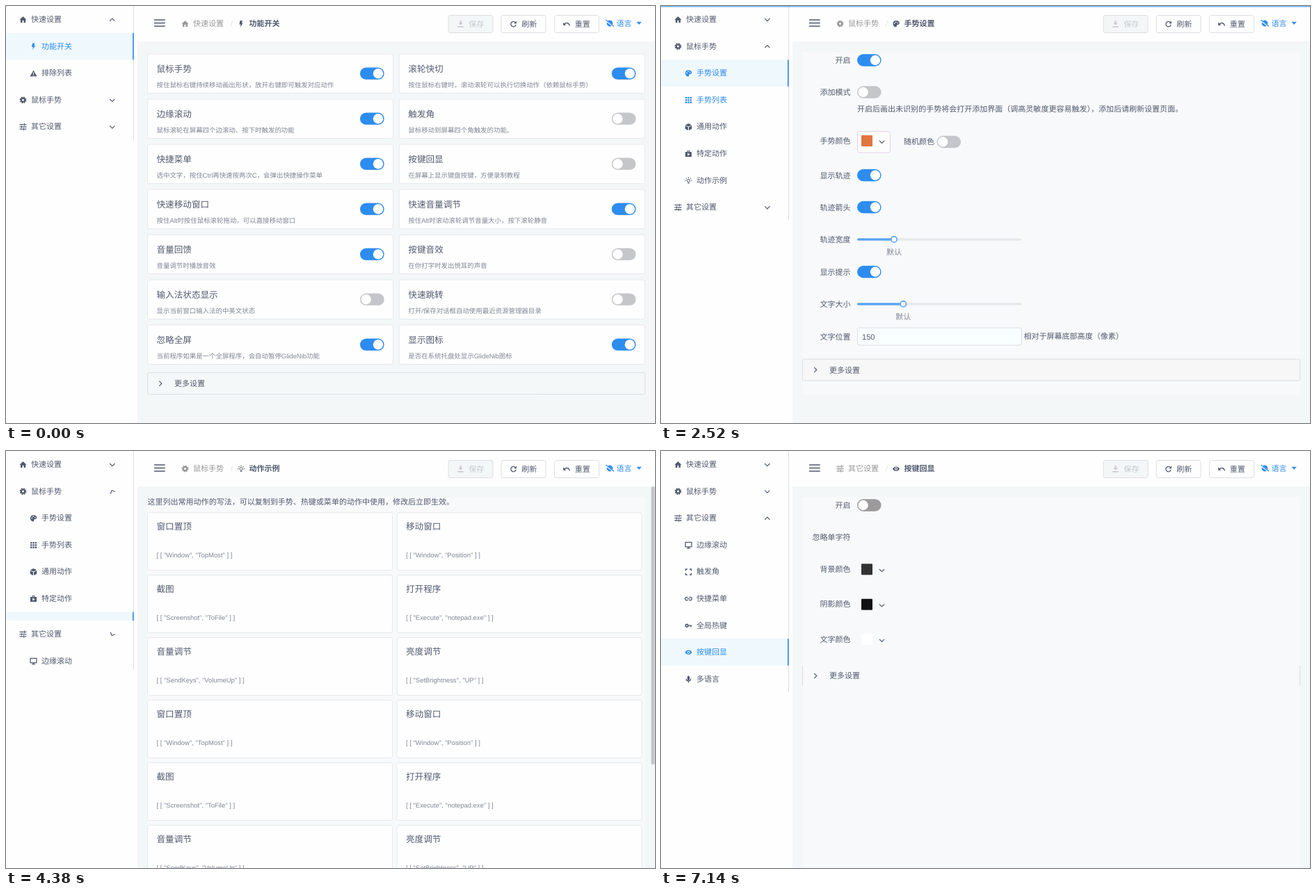
Animation, 933 px wide and 600 px high, one loop 7380 ms. Source, as an HTML page:

```html
<!DOCTYPE html>
<html lang="zh-CN">
<head>
<meta charset="utf-8">
<title>设置</title>
<style>
html, body { margin: 0; width: 100%; height: 100%; overflow: hidden; background: #f3f7f8; }
svg { display: block; }
#stage { width: 100%; height: 100%; }
text { font-family: "Liberation Sans", "Noto Sans CJK SC", "Noto Sans CJK", sans-serif; text-rendering: geometricPrecision; }
.ln { fill: none; stroke: currentColor; stroke-width: 1.3; }
.page { visibility: hidden; }
.page.on { visibility: visible; }
</style>
</head>
<body>
<svg id="stage" viewBox="0 0 933 600"></svg>
<script>
const INK = '#515a6e', BLUE = '#2d8cf0', GREY = '#808695', EDGE = '#dcdee2', PINK = '#e3b5ea';
const BIG = 12.6, MID = 11.02, SMALL = 9.45, ROW = 38.6;

// ---- drawing helpers ----
const text = (x, y, s, size = MID, fill = INK, more = '') =>
  `<text x="${x}" y="${(y + size * 0.37).toFixed(2)}" font-size="${size}" fill="${fill}" ${more}>${s}</text>`;
const END = 'text-anchor="end"', CENTER = 'text-anchor="middle"', BOLD = 'font-weight="700"';
const rect = (x, y, w, h, fill, stroke = 'none', r = 0) =>
  `<rect x="${x}" y="${y}" width="${w}" height="${h}" rx="${r}" fill="${fill}" stroke="${stroke}"/>`;
const line = (d, color, w = 1) => `<path d="${d}" fill="none" stroke="${color}" stroke-width="${w}"/>`;
const chevron = (x, y, turn = 0) =>
  `<path transform="translate(${x} ${y}) rotate(${turn})" d="M-3.6-1.8L0 1.8 3.6-1.8" fill="none" stroke="${INK}" stroke-width="1.2"/>`;
const toggle = (x, y, on, off = '#c5c6c9') =>
  rect(x, y - 8.65, 34.6, 17.3, on ? BLUE : off, 'none', 8.65) +
  `<circle cx="${x + (on ? 26 : 8.65)}" cy="${y}" r="7.2" fill="#fff"/>`;
const check = (y, on, off = EDGE) => on
  ? rect(220, y - 6.2, 12.4, 12.4, BLUE, 'none', 1.6) + line(`M223.2 ${y}l2.2 2.3 4-4.3`, '#fff', 1.5)
  : rect(220.5, y - 5.7, 11.4, 11.4, '#fff', off, 1.6);
const button = (x, y, w, s) =>
  rect(x, y, w, 25.3, BLUE, 'none', 3) + text(x + w / 2, y + 12.6, s, MID, '#fff', CENTER + ' ' + BOLD);
const more = (y, s = '更多设置', x = 242, x2 = 918.5, fill = '#f5f8f8') =>
  rect(203.5, y, x2 - 203.5, 31, fill, EDGE, 2) + chevron(x - 20, y + 15.5, -90) + text(x, y + 15.5, s);
const label = (y, s) => text(272.5, y, s, MID, INK, END);
const links = (x, y, size, gap, ...words) => words.map((w, i) =>
  text(x + i * gap, y, w, size, BLUE) +
  (i ? line(`M${x + i * gap - 6.5} ${y - 4.5}v9`, EDGE) : '')).join('');
const cmd = (...a) => `[ [ ${a.map(s => `"${s}"`).join(', ')} ] ]`;
const HEAD = 28.4;
function grid(y, x2, rh, n, cols, edge = '#dfe2e8', inner = edge) {
  const h = HEAD + rh * n;
  let d = '';
  for (let i = 0; i < n; i++) d += `M203.5 ${y + HEAD + i * rh}H${x2}`;
  return rect(203.5, y, x2 - 203.5, h, '#fdfdfe') + rect(203.5, y, x2 - 203.5, HEAD, '#f8f9fa') +
    line(d, inner) + line(`M${cols[cols.length - 1] - 1} ${y}v${h}`, 'rgba(0,0,0,.05)', 3) +
    line(cols.map(x => `M${x} ${y}v${h}`).join(''), edge) + rect(203.5, y, x2 - 203.5, h, 'none', edge);
}
const heads = (y, list) => list.map(([x, s, a]) => text(x, y, s, SMALL, INK, BOLD + ' ' + (a || ''))).join('');
const panel = h => rect(203, 66, 716, h, '#f7f9fa');

// ---- icons, drawn around 0,0 ----
const solid = d => `<path fill="currentColor" fill-rule="evenodd" d="${d}"/>`;
const wire = d => `<path class="ln" d="${d}"/>`;
const ICONS = {
  home: solid('M-5 .2L0-4.6 5 .2H3.6V4.4H1V1.2H-1V4.4H-3.6V.2z'),
  bolt: solid('M-1.4-4.6H2L.8-1.2H2.6L-1.2 5-.5.8H-2.6z'),
  warn: solid('M0-4.4L5 4.4H-5zM-.6-1.2V1.8H.6V-1.2zM-.6 2.5V3.6H.6V2.5z'),
  gear: '<circle class="ln" r="2.6" style="stroke-width:2.2"/><circle class="ln" r="4.1" style="stroke-width:1.6" stroke-dasharray="1.9 1.32"/>',
  tune: wire('M-5-3.3H1M3-3.3H5M2-5V-1.6M-5 0H-3M-1 0H5M-2-1.7V1.7M-5 3.3H0M2 3.3H5M1 1.6V5'),
  palette: solid('M0-4.6C6-4.6 6 1.4 2 1.2 0 1.2 1.6 4.6-.4 4.6-6 4-6-4.6 0-4.6zM-3-1.2V.4H-1.6V-1.2zM-1-3.2V-1.8H.4V-3.2zM1.6-2V-.6H3V-2z'),
  dots: solid([-4.4, -1.1, 2.2].map(y => [-4.4, -1.1, 2.2].map(x => `M${x} ${y}h2.3v2.3h-2.3z`).join('')).join('')),
  cube: solid('M0-5L4.6-2.8 0-.6-4.6-2.8zM-4.8-1.9L-.5.2V5L-4.8 2.8zM4.8-1.9L.5.2V5L4.8 2.8z'),
  bag: solid('M-4.5-2.6H-2V-4.6H2V-2.6H4.5V4.5H-4.5zM-1-3.6V-2.6H1V-3.6zM-1.2-1V3L2.2 1z'),
  bulb: '<circle class="ln" r="2.1" style="stroke-width:1"/>' + wire('M-1.2 3.6H1.2M0-5V-3.8M-5 0H-3.8M5 0H3.8M-3.5-3.5l.8.8M3.5-3.5l-.8.8'),
  screen: wire('M-4.4-4H4.4V2.4H-4.4zM-2.4 4.4H2.4M0 2.4V4.4'),
  corners: wire('M-4-1.6V-4H-1.6M1.6-4H4V-1.6M4 1.6V4H1.6M-1.6 4H-4V1.6'),
  link: wire('M-.8-2.2H-2.6A2.2 2.2 0 0 0-2.6 2.2H-.8M.8-2.2H2.6A2.2 2.2 0 0 1 2.6 2.2H.8M-2 0H2'),
  key: '<circle class="ln" cx="-2.4" r="1.8" style="stroke-width:1.7"/>' + wire('M-.6 0H5M3.6 0V2.4'),
  eye: solid('M-5 0C-2.4-4.4 2.4-4.4 5 0 2.4 4.4-2.4 4.4-5 0zM0-2.1A2.1 2.1 0 1 0 .01-2.1z') + '<circle r="1.1" fill="currentColor"/>',
  mic: solid('M-1.6-3.4A1.6 1.6 0 0 1 1.6-3.4V0A1.6 1.6 0 0 1-1.6 0z') + wire('M-3.2-.6A3.2 3.2 0 0 0 3.2-.6M0 2.6V5'),
  save: solid('M-1-5H1V-1.6H3.2L0 1.6-3.2-1.6H-1zM-4.4 3H4.4V4.4H-4.4z'),
  reload: wire('M3.2-1.8A3.7 3.7 0 1 0 3.6 1') + solid('M4.4-4.4V-.8H.8z'),
  undo: wire('M-3.6.6C-1.4-2.6 3-2.4 4.4 2.4') + solid('M-5-2.6V1.8H-.8z'),
};
const icon = (name, x, y, color = INK) => `<g transform="translate(${x} ${y})" color="${color}">${ICONS[name]}</g>`;

// ---- menu ----
const GROUPS = [
  ['快速设置', 'home', ['功能开关', 'bolt'], ['排除列表', 'warn']],
  ['鼠标手势', 'gear', ['手势设置', 'palette'], ['手势列表', 'dots'], ['通用动作', 'cube'], ['特定动作', 'bag'], ['动作示例', 'bulb']],
  ['其它设置', 'tune', ['边缘滚动', 'screen'], ['触发角', 'corners'], ['快捷菜单', 'link'], ['全局热键', 'key'], ['按键回显', 'eye'], ['多语言', 'mic']],
];
const crumbs = [];
const menu = GROUPS.map(([name, ic, ...items]) =>
  `<g class="group">${icon(ic, 24.5, 19.5)}${text(36, 19, name)}<g class="arrow">${chevron(0, 0)}</g>` +
  `<svg class="sub" y="${ROW}" width="186" height="0" overflow="hidden">` + items.map(([s, i], k) => {
    crumbs.push(icon(ic, 257.5, 25.5, '#999') + text(269, 25.2, name, MID, '#999') + text(323, 25.2, '/', MID, EDGE) +
      icon(i, 338, 25.7) + text(349.5, 25.2, s, MID, INK, BOLD));
    return `<g class="item" transform="translate(0 ${k * ROW})">` +
      `<rect class="tint" width="183" height="${ROW}" fill="#eff8fd"/><rect class="mark" x="182" width="1.6" height="${ROW}" fill="${BLUE}"/>` +
      icon(i, 39.5, 19.6, 'inherit') + text(51, 19, s, MID, 'currentColor') + '</g>';
  }).join('') + '</svg></g>').join('');

// ---- pages ----
const CARDS = [
  ['鼠标手势', '按住鼠标右键持续移动画出形状，放开右键即可触发对应动作', 1], ['滚轮快切', '按住鼠标右键时，滚动滚轮可以执行切换动作（依赖鼠标手势）', 1],
  ['边缘滚动', '鼠标滚轮在屏幕四个边滚动、按下时触发的功能', 1], ['触发角', '鼠标移动到屏幕四个角触发的功能。', 0],
  ['快捷菜单', '选中文字，按住Ctrl再快速按两次C，会弹出快捷操作菜单', 1], ['按键回显', '在屏幕上显示键盘按键，方便录制教程', 0],
  ['快速移动窗口', '按住Alt时按住鼠标滚轮拖动，可以直接移动窗口', 1], ['快速音量调节', '按住Alt时滚动滚轮调节音量大小，按下滚轮静音', 1],
  ['音量回馈', '音量调节时播放音效', 1], ['按键音效', '在你打字时发出悦耳的声音', 0],
  ['输入法状态显示', '显示当前窗口输入法的中英文状态', 0], ['快速跳转', '打开/保存对话框自动使用最近资源管理器目录', 0],
  ['忽略全屏', '当前程序如果是一个全屏程序，会自动暂停GlideNib功能', 1], ['显示图标', '是否在系统托盘处显示GlideNib图标', 1],
];
const switches = () => CARDS.map(([name, note, on], i) => {
  const x = 203.5 + i % 2 * 361.8, y = 69 + (i >> 1) * 65;
  return rect(x, y, 353, 56.5, '#fefefe', '#e6e9ed', 3) + text(x + 13, y + 21, name, BIG) +
    text(x + 13, y + 44.3, note, SMALL, GREY) + toggle(x + 305.5, y + 28.2, on);
}).join('') + more(527.7);

const excluded = () => panel(494) + text(203.5, 72.5, '默认配置下，画手势Z可以添加程序到此列表中') +
  text(203.5, 97, '在此列表中的程序不会启用鼠标手势等功能，忽略大小写。') + text(203.5, 131, '当前排除程序列表：') +
  text(203.5, 164, 'Photoshop.exe') + text(919, 164, '删除', MID, BLUE, END) +
  rect(203.5, 186.5, 670, 24.5, '#fafafc', PINK, 3) + text(210, 198.8, 'Photoshop.exe', MID, '#c3b3e8') +
  rect(870, 186, 49, 25.3, BLUE, 'none', 2) + text(894.5, 198.5, '添加', MID, '#fff', CENTER);

const slider = (y, x) => rect(282, y - 1.6, 236.5, 3.2, '#e6e8eb', 'none', 1.6) + rect(282, y - 1.6, x - 282, 3.2, '#57a3f3', 'none', 1.6) +
  `<circle cx="${x}" cy="${y}" r="4.2" fill="#fff" stroke="#57a3f3" stroke-width="1.6"/>` + text(x, y + 18.5, '默认', MID, GREY, CENTER);
const settings = () => panel(494) +
  [[78, '开启', 1], [124, '添加模式', 0], [243.5, '显示轨迹', 1], [289.5, '轨迹箭头', 1], [382.5, '显示提示', 1]]
    .map(([y, s, on]) => label(y, s) + toggle(282, y, on)).join('') +
  text(282, 148, '开启后画出未识别的手势将会打开添加界面（调高灵敏度更容易触发），添加后请刷新设置页面。') +
  label(193.5, '手势颜色') + rect(282.5, 180.5, 47, 30.5, '#fdfdfe', '#e6cfe6', 3) + rect(288, 186, 16, 16, '#e17540', 'none', 1) +
  chevron(317.5, 195.5) + text(349, 195, '随机颜色') + toggle(396.5, 195.5, 0) +
  label(335.5, '轨迹宽度') + slider(335.8, 335) + label(428.5, '文字大小') + slider(428.8, 348.3) +
  label(475.5, '文字位置') + rect(282.5, 463, 236, 25, '#f8fdfe', EDGE, 3) + text(289, 476, '150') +
  text(521.5, 475, '相对于屏幕底部高度（像素）') + more(508, '更多设置', 242, 918.5, '#f6f7f6');

const STROKES = {
  UP: 'M0 17V-12', DOWN: 'M0-15V13', LEFT: 'M16 0H-13', RIGHT: 'M-16 0H13',
  'DOWN-UP': 'M-2.8-15L0 16 2.7-12', 'UP-DOWN': 'M-2.8 15L0-16 3 13',
  'DOWN-RIGHT': 'M-15.5-16V16H12', 'DOWN-LEFT': 'M15.5-16V16H-12',
  'RIGHT-LEFT': 'M-16-4L16 0-11 3.5', 'LEFT-RIGHT': 'M16-4L-16 0 12 2.2',
  h: 'M-6-16V16V0H6.5V12',
};
const gesture = (name, y) => `<path transform="translate(292.5 ${y})" d="${STROKES[name]}" fill="none" stroke="#e67b45" stroke-width="1.7" marker-start="url(#dot)" marker-end="url(#tip)"/>` +
  text(382, y, name, SMALL, '#c5c8ce', END + ' ' + BOLD);
function gestures(y, rows) {
  const mid = y + HEAD / 2;
  return grid(y, 912.5, 46.6, rows.length, [255, 397, 499.5, 826]) +
    heads(mid, [[229.5, '有效', CENTER], [326, '手势', CENTER], [411.5, '名称'], [514, '动作'], [869, '操作', CENTER]]) +
    rows.map(([g, name, key], i) => {
      const c = y + HEAD + (i + 0.5) * 46.6;
      return check(c, 1) + gesture(g, c) + text(411.5, c, name, SMALL) + text(514, c, cmd('SendKeys', key), SMALL) +
        links(844, c, SMALL, 32.2, '修改', '删除');
    }).join('');
}
const scrollbar = h => rect(927.5, 51, 5, h, '#c3c5c8', 'none', 2.5);
const shapes = () => panel(534) + text(203.5, 72.5, '这里管理所有可以识别的手势形状。') +
  grid(89.5, 912.5, 46.6, 11, [255, 397, 826]) + heads(103.7, [[326, '手势', CENTER], [869, '操作', CENTER]]) +
  Object.keys(STROKES).map((g, i) => gesture(g, 141.2 + i * 46.6) + links(844, 141.2 + i * 46.6, SMALL, 32.2, '修改', '删除')).join('');
const common = () => panel(534) + text(203.5, 72.5, '这里设置的手势动作对所有程序有效，特定动作中的设置会优先响应。') +
  gestures(89.5, [['UP', '复制', 'Ctrl+C'], ['DOWN', '粘贴', 'Ctrl+V'], ['LEFT', '后退', 'Alt+Left'], ['RIGHT', '前进', 'Alt+Right'],
    ['DOWN-LEFT', '撤销', 'Ctrl+Z'], ['DOWN-RIGHT', '关闭', 'Alt+F4'], ['UP-DOWN', '剪切', 'Ctrl+X'], ['DOWN-UP', '全选', 'Ctrl+A'],
    ['LEFT-RIGHT', '保存', 'Ctrl+S'], ['RIGHT-LEFT', '退出', 'Escape'], ['h', '桌面', 'Win+D']]) + scrollbar(420);
const specific = () => panel(534) + text(203.5, 72.5, '这里对指定程序设置的手势动作会优先于通用动作手势响应。') +
  line('M203.5 115H913', EDGE) + line('M203.5 114.5H257', BLUE, 1.6) +
  ['浏览器', 'Velmor', 'Brindal', 'Cobble Drafts'].map((s, i) => text([216, 270, 329, 382.5][i], 102, s, SMALL, i ? INK : BLUE)).join('') +
  links(820.5, 97, MID, 35.3, '修改', '克隆', '删除') + more(128, '程序列表', 241, 913, '#fafbfb') +
  gestures(167.5, [['UP', '页面顶部', 'Home'], ['DOWN', '页面底部', 'End'], ['DOWN-UP', '刷新', 'Ctrl+R'], ['UP-DOWN', '强制刷新', 'Ctrl+Shift+R'],
    ['DOWN-RIGHT', '关闭标签', 'Ctrl+W'], ['RIGHT-LEFT', '切换到右侧标签', 'Ctrl+PgDn'], ['LEFT-RIGHT', '切换到左侧标签', 'Ctrl+PgUp'], ['h', '打开主页', 'Alt+Home']]) +
  button(203.2, 576, 47.4, '新建') + scrollbar(534);

const SAMPLES = ['窗口置顶', '移动窗口', '截图', '打开程序', '音量调节', '亮度调节'];
const samples = () => panel(534) + text(203.5, 72.5, '这里列出常用动作的写法，可以复制到手势、热键或菜单的动作中使用，修改后立即生效。') +
  Array.from({ length: 12 }, (_, i) => {
    const x = 203.5 + i % 2 * 358.5, y = 88.5 + (i >> 1) * 90;
    return rect(x, y, 352, 83, '#fefefe', '#e6e9ed', 3) + text(x + 13, y + 20, SAMPLES[i % 6], BIG) +
      text(x + 13, y + 61, cmd(...[['Window', 'TopMost'], ['Window', 'Position'], ['Screenshot', 'ToFile'],
        ['Execute', 'notepad.exe'], ['SendKeys', 'VolumeUp'], ['SetBrightness', 'UP']][i % 6]), SMALL, GREY);
  }).join('') + scrollbar(400);

const edges = (note, rows) => panel(534) + text(203.5, 72.8, '开启') + toggle(228.8, 73, 1) + text(203.5, 97.5, note) +
  grid(114.5, 918.5, 31.5, rows.length, [863], PINK, '#f0f2f5') +
  heads(129, [[229.5, '有效', CENTER], [269.5, '位置'], [325, '名称'], [419.5, '向上动作'], [572, '向下动作'], [725, '按下动作'], [891, '操作', CENTER]]) +
  rows.map((r, i) => {
    const y = 159 + i * 31.5;
    return check(y, i < 2, PINK) + r.map((s, k) => text([269.5, 325, 419.5, 572, 725][k], y, s, SMALL)).join('') +
      text(891, y, '修改', SMALL, BLUE, CENTER);
  }).join('');
const edgePage = () => edges('鼠标滚轮在屏幕四个边滚动、按下时触发的功能。', [
  ['左', '音量调节', '[ [ "SendKeys", "VolumeUp...', '[ [ "SendKeys", "VolumeDo...', '[ [ "SendKeys", "VolumeMu...'],
  ['上', '标签页切换', '[ [ "SendKeys", "Ctrl+PgUp...', '[ [ "SendKeys", "Ctrl+PgDn...', '[]'],
  ['右', '亮度调节', cmd('SetBrightness', 'Up'), cmd('SetBrightness', 'Down'), '[ [ "SetBrightness", "DEFA...'],
  ['下', '程序切换', '[ [ "SendKeys", "Ctrl+Alt+S...', '[ [ "SendKeys", "Ctrl+Alt+T...', cmd('SendKeys', 'Space')]]);
const cornerPage = () => edges('鼠标移动到屏幕四个角触发的功能。',
  ['左上', '右上', '左下', '右下'].map(s => [s, '触发动作', '[]', '[]', '[]']));

const keyTable = (note, rows) => panel(534) + text(203.5, 72.5, note) + grid(89.5, 918.5, 31.5, rows.length, [255, 365.5, 460, 831.5]) +
  heads(104, [[229.5, '有效', CENTER], [269.5, '名称'], [380, '热键'], [474.5, '动作'], [875, '操作', CENTER]]) +
  rows.map(([on, name, key, ...a], i) => {
    const y = 133.3 + i * 31.52;
    return check(y, on) + text(269.5, y, name, SMALL) + text(380, y, key, SMALL) + text(474.5, y, cmd(...a), SMALL) +
      links(849.5, y, SMALL, 32, '修改', '删除');
  }).join('') + button(203.2, 126.5 + rows.length * 31.5, 47.4, '新建');
const quickMenu = () => keyTable('选中文字后弹出的快捷操作菜单', [
  [1, '复制', 'C', 'SendKeys', 'Ctrl+C'], [1, '剪切', 'X', 'SendKeys', 'Ctrl+X'], [1, '粘贴', 'V', 'SendKeys', 'Ctrl+V'], [1, '打开', 'O', 'Execute', '%text%']]);
const hotkeys = () => keyTable('直接使用热键触发动作', [
  [1, '高清截图', 'Ctrl+PrtSc', 'ScreenshotHQ', 'ToFile', 'DrawCursor|TransparencyGrid'], [0, '打开记事本', 'Win+N', 'Execute', 'notepad.exe'],
  [1, '定位程序位置', 'Ctrl+Alt+E', 'Explorer', 'select', '%filepath%'], [1, '隐藏窗口到托盘', 'Ctrl+Alt+Z', 'Window', 'HideTray'],
  [1, '调高亮度', 'Alt+PageUp', 'SetBrightness', 'UP'], [1, '调低亮度', 'Alt+PageDown', 'SetBrightness', 'DOWN'],
  [1, '默认亮度', 'Alt+End', 'SetBrightness', 'DEFAULT'], [1, '暂停恢复GlideNib', 'Ctrl+Alt+M', 'Internal', 'Pause'],
  [0, '切换GlideNib图标', 'Ctrl+Alt+I', 'Internal', 'Icon'], [1, '框选画中画', 'Ctrl+Alt+P', 'Snapshot', 'PiP'],
  [1, '框选OCR', 'Ctrl+Alt+O', 'Snapshot', 'OCR'], [1, '剪贴板贴图', 'Ctrl+Alt+S', 'GetClipboard', 'Stick']]);
const echo = () => panel(534) + label(78, '开启') + toggle(282, 78, 0, '#9c9a9a') + label(124, '忽略单字符') +
  [['背景颜色', '#333'], ['阴影颜色', '#111'], ['文字颜色', '#fff']].map(([s, c], i) => {
    const y = 169.8 + i * 50.4;
    return label(y, s) + rect(288, y - 7.5, 16, 16, c, 'none', 1) + chevron(317.5, y + 2);
  }).join('') + chevron(222, 323.5, -90) + text(242, 323, '更多设置') + line('M203.5 309V338M918.5 309V338', EDGE);

const PAGES = [switches, excluded, settings, shapes, common, specific, samples, edgePage, cornerPage, quickMenu, hotkeys, echo];

// ---- frame ----
const topButton = (x, name, s, ink = INK, fill = '#fefefe') =>
  rect(x + 0.5, 13.5, 64, 25, fill, EDGE, 3) + icon(name, x + 18, 26, ink) + text(x + 29.7, 26, s, MID, ink);
const stage = document.getElementById('stage');
stage.innerHTML = '<defs>' +
  '<marker id="tip" markerUnits="userSpaceOnUse" markerWidth="8" markerHeight="8" refX="2" refY="4" orient="auto"><path d="M0 1.2L6 4 0 6.8z" fill="#e67b45"/></marker>' +
  '<marker id="dot" markerUnits="userSpaceOnUse" markerWidth="4" markerHeight="4" refX="2" refY="2"><circle cx="2" cy="2" r="1.6" fill="#e67b45"/></marker></defs>' +
  rect(0, 0, 933, 600, '#f3f7f8') + PAGES.map(p => `<g class="page">${p()}</g>`).join('') +
  rect(0, 0, 189, 600, '#fefefe') + rect(189, 0, 744, 51, '#fefefe') +
  PAGES.map((_, i) => `<g class="page">${crumbs[i]}</g>`).join('') +
  line('M213 20H228.7M213 24.5H228.7M213 29H228.7', INK, 1.6) +
  topButton(635.5, 'save', '保存', '#c5c8ce', '#f4f7f7') + topButton(711.5, 'reload', '刷新') + topButton(788, 'undo', '重置') +
  `<circle cx="868" cy="25" r="4.4" fill="${BLUE}"/>` + line('M863 21.4L874 29.6', '#fefefe', 2.4) + line('M862.4 20L874 29.2', BLUE, 1.2) +
  text(877.5, 25, '语言', MID, BLUE) + `<path d="M906.4 22.8h7.4l-3.7 4z" fill="${BLUE}"/>` +
  `<path id="side" fill="none" stroke="${EDGE}"/>` + menu + `<rect id="bar" height="1.6" fill="${BLUE}"/>`;

// ---- motion ----
const LOOP = 7380, STEP = 60;
// [page, opened at, progress bar gone from]
const VISITS = [[0, -999, -400], [1, 690, 1080], [2, 1790, 2460], [3, 2620, 2860], [4, 2920, 3300], [5, 3490, 3720],
  [6, 3770, 4080], [7, 4830, 5280], [8, 5370, 5580], [9, 5680, 5880], [10, 6010, 6240], [11, 6290, 6480]];
const HOVERS = [[1, 180, 690], [3, 1440, 1740], [3, 2100, 2620], [4, 2820, 2920], [8, 5040, 5370]];
const clamp = v => Math.max(0, Math.min(1, v));
const ease = (t, from, ms) => { const p = clamp((t - from) / ms); return p * p * (3 - 2 * p); };
const all = q => [...stage.querySelectorAll(q)];
const pages = all('.page'), groups = all('.group'), subs = all('.sub'), arrows = all('.arrow'), items = all('.item');
const tints = all('.tint'), marks = all('.mark'), bar = document.getElementById('bar'), side = document.getElementById('side');

function draw(t) {
  const now = VISITS.filter(v => v[1] <= t).length - 1;
  const [page, since, gone] = VISITS[now], age = t - since;
  pages.forEach((p, i) => p.classList.toggle('on', i % PAGES.length === page));

  items.forEach((el, i) => {
    const active = i === page, last = i === page - 1;
    const hover = HOVERS.some(([k, a, b]) => k === i && t >= a && t < b);
    el.setAttribute('color', active || hover || (last && age < 150) ? BLUE : INK);
    tints[i].setAttribute('opacity', active ? clamp(age / 240) : last ? 1 - clamp(age / 200) : 0);
    marks[i].setAttribute('opacity', active ? 1 : 0);
  });

  const first = ease(t, 1240, 260), second = ease(t, 4320, 260);
  let y = 0;
  [1 - first, first - second, second].forEach((open, i) => {
    const h = open * ROW * (GROUPS[i].length - 2);
    groups[i].setAttribute('transform', `translate(0 ${y})`);
    subs[i].setAttribute('height', h);
    arrows[i].setAttribute('transform', `translate(152.8 19.8) rotate(${180 * open})`);
    y += ROW + h;
  });
  side.setAttribute('d', `M183.5 0V${y}`);

  bar.setAttribute('width', 933 * clamp(age / 200));
  bar.setAttribute('opacity', clamp(age / 280) * (1 - clamp((t - gone) / 160)));
}
function tick() {
  draw(Math.floor(performance.now() % LOOP / STEP) * STEP);
  requestAnimationFrame(tick);
}
tick();
</script>
</body>
</html>
```
